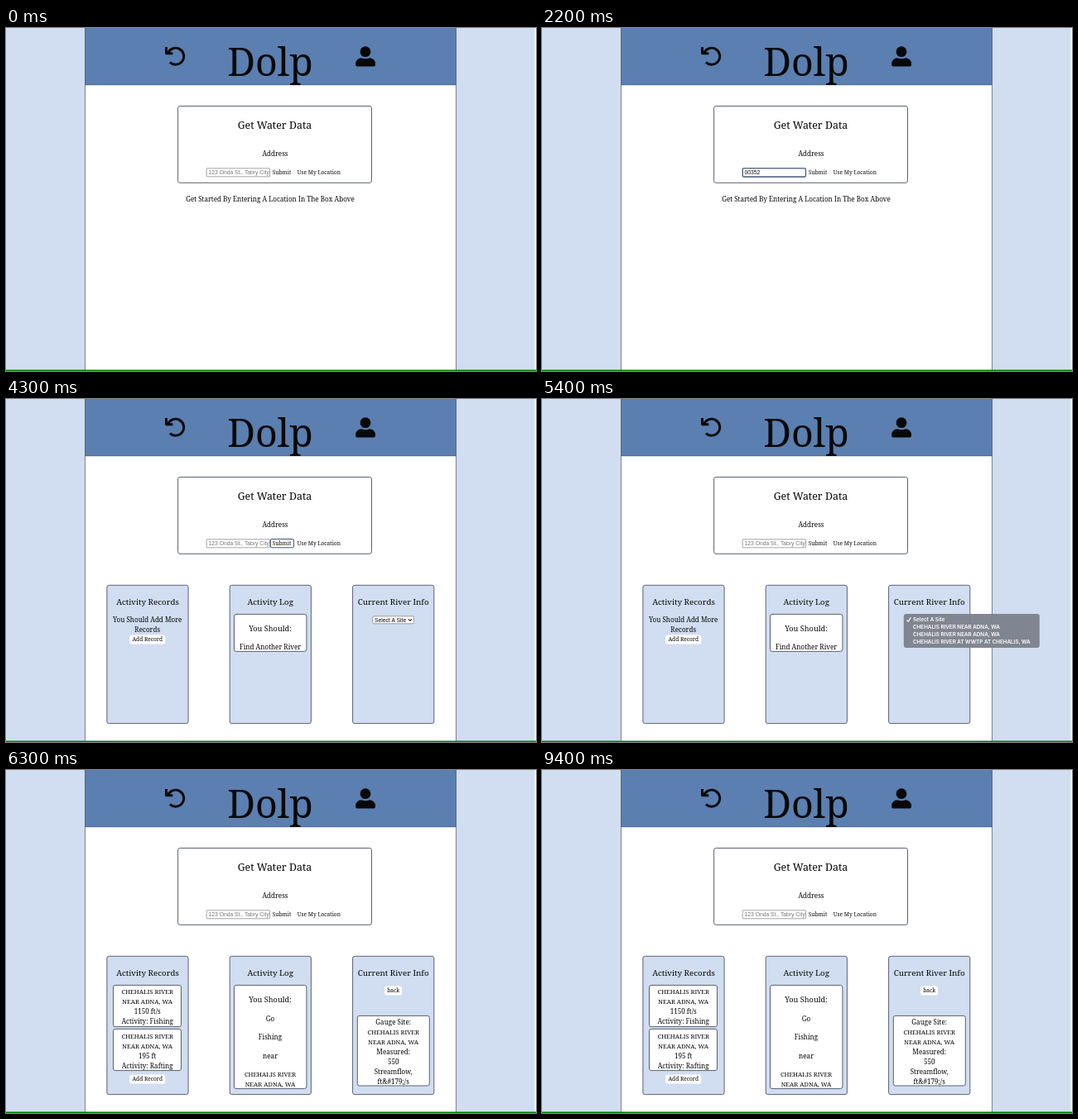
An HTML page that plays this animation: 640 by 415 pixels, repeating every 9.7 s.

```html
<!DOCTYPE html>
<html lang="en">
<head>
<meta charset="utf-8">
<title>Water data</title>
<style>
html, body { margin: 0; width: 100%; height: 100%; overflow: hidden; background: #fff; }
svg { display: block; width: 640px; height: 415px; }
text { font-family: "Noto Serif", serif; fill: #080808; white-space: pre; }
.ui { font-family: "Liberation Sans", Arial, sans-serif; }
.menu { font-family: Inter, sans-serif; font-weight: 600; fill: #fff; }
.hint { fill: #777; }
</style>
</head>
<body>
<svg id="stage" viewBox="0 0 640 415"></svg>
<script>
const LOOP = 9700;
const PALE = '#d1ddf0', LINE = '#4a5261', BLUE = '#5a7fb0', FOCUS = '#3a5480';
const stage = document.getElementById('stage');

function add(parent, tag, attrs = {}, content = '') {
  const el = document.createElementNS('http://www.w3.org/2000/svg', tag);
  for (const key in attrs) el.setAttribute(key, attrs[key]);
  el.textContent = content;
  return parent.appendChild(el);
}

const group = (parent = stage) => add(parent, 'g');

function box(parent, x, y, width, height, fill, stroke = 'none', rx = 0, lineWidth = 1) {
  return add(parent, 'rect', { x, y, width, height, fill, stroke, rx, 'stroke-width': lineWidth });
}

// y is the middle of the capital letters
function label(parent, content, x, y, size, className = '', anchor = 'middle') {
  return add(parent, 'text', {
    x, y: y + size * 0.357, 'font-size': size, 'text-anchor': anchor, class: className
  }, content);
}

// Opacity changes as hard steps: [time, value] pairs, hidden before the first one
function steps(el, table) {
  const start = table[0][0] > 0 ? [[0, 0]] : [];
  const end = [LOOP, table[table.length - 1][1]];
  const frames = [...start, ...table, end].map(([time, opacity]) => ({
    offset: time / LOOP, opacity, easing: 'steps(1, end)'
  }));
  el.animate(frames, { duration: LOOP, iterations: Infinity });
}

function lines(parent, rows, x, top, gap) {
  rows.forEach((row, i) => {
    const size = row === row.toUpperCase() && row.length > 4 ? 7.5 : 8.1;
    label(parent, row, x, top + i * gap, size);
  });
}

function button(parent, content, x, y, width) {
  box(parent, x - width / 2, y - 5.5, width, 11, '#fff', 'none', 2.5);
  label(parent, content, x, y, 6.6);
}

function panel(parent, x, y, width, height, fill = '#fff') {
  box(parent, x, y, width, height, fill, LINE, 2.5, 0.9);
}

function drawPage() {
  box(stage, 0, 0, 638.6, 415, PALE);
  box(stage, 95, 0, 449, 415, '#fff');
  box(stage, 95, 0, 449, 69, BLUE);
  box(stage, 95, 68.6, 449, 0.6, '#3d5578');
  box(stage, 95, 0, 0.8, 415, '#5a6474');
  box(stage, 543, 0, 0.8, 415, '#5a6474');
  box(stage, 0, 413.5, 640, 1.5, 'green');

  add(stage, 'path', {
    d: 'M193.5 23V30.8H201.3M195.4 30.6A10 10 0 1 1 198 41.6',
    fill: 'none', stroke: '#080808', 'stroke-width': 2.9, 'stroke-linejoin': 'round'
  });
  add(stage, 'circle', { cx: 434, cy: 28.7, r: 6.4, fill: '#080808' });
  add(stage, 'path', {
    d: 'M422.2 44.5v-1.2a7 7 0 0 1 7-7q4.9 2 9.8 0a7 7 0 0 1 7 7v1.2a2 2 0 0 1-2 2h-19.8a2 2 0 0 1-2-2z',
    fill: '#080808'
  });
  label(stage, 'Dolp', 319, 41, 46.5);

  panel(stage, 207.6, 94.5, 233.9, 92.8);
  label(stage, 'Get Water Data', 324.5, 118, 12.4);
  label(stage, 'Address', 325, 152.5, 8.1);
  box(stage, 242.2, 169.8, 76.4, 10, '#fff', '#8e8e8e', 0.5, 0.8);
  label(stage, 'Submit', 333, 175, 6.6);
  label(stage, 'Use My Location', 377.8, 175, 6.65);
}

function drawSearch() {
  const hint = label(stage, '123 Onda St., Tabry City', 244.5, 175, 6.75, 'ui hint', 'start');
  const value = label(stage, '00352', 244.5, 175, 6.75, 'ui', 'start');
  const focus = group();
  box(focus, 242.3, 169.7, 76.2, 10.4, 'none', FOCUS, 1.5, 1.1);
  const caret = box(stage, 244.2, 171.2, 0.7, 7.4, '#111');
  const submit = box(stage, 319.4, 169.5, 28.2, 10.3, 'none', FOCUS, 1.5, 1);

  const prompt = label(stage, 'Get Started By Entering A Location In The Box Above', 319, 207, 8.1);
  const popup = group();
  box(popup, 242, 181, 96, 26, '#434649', 'none', 2);
  label(popup, '00352', 248, 194.3, 6.6, 'menu', 'start');

  steps(hint, [[0, 1], [1800, 0], [2900, 1]]);
  steps(value, [[1800, 1], [2900, 0]]);
  steps(focus, [[1100, 1], [2900, 0]]);
  steps(caret, [[1100, 1], [1800, 0]]);
  steps(popup, [[1500, 1], [2000, 0.7], [2100, 0.35], [2200, 0]]);
  steps(submit, [[2900, 0.6], [3000, 1], [5100, 0]]);
  steps(prompt, [[0, 1], [4300, 0]]);
}

function drawCards() {
  const cards = group();
  [['Activity Records', 171], ['Activity Log', 319.3], ['Current River Info', 467.7]].forEach(([title, x]) => {
    panel(cards, x - 49.1, 225.3, 98.2, 167.3, PALE);
    label(cards, title, x, 245.5, 9.8);
  });
  steps(cards, [[4300, 1]]);
}

function drawEmptyState() {
  const empty = group();
  lines(empty, ['You Should Add More', 'Records'], 170.7, 267, 12);
  button(empty, 'Add Record', 170.8, 291, 43);
  panel(empty, 275.5, 260.4, 87.4, 45);
  label(empty, 'You Should:', 319, 278, 9.2);
  label(empty, 'Find Another River', 319, 300, 8.1);

  box(empty, 442.8, 262.8, 49.8, 9, '#fff', '#777', 1.5, 0.7);
  label(empty, 'Select A Site', 445, 267.4, 6.8, 'ui', 'start');
  add(empty, 'path', { d: 'M486 266.3l2 2 2-2', fill: 'none', stroke: '#111', 'stroke-width': 1.1 });
  steps(empty, [[4300, 1], [6300, 0]]);
}

function drawResults() {
  const site = ['CHEHALIS RIVER', 'NEAR ADNA, WA'];
  const results = group();
  panel(results, 129.5, 260.4, 82, 50.2);
  lines(results, [...site, '1150 ft/s', 'Activity: Fishing'], 170.7, 268.5, 12);
  panel(results, 129.5, 313.4, 82, 50.2);
  lines(results, [...site, '195 ft', 'Activity: Rafting'], 170.7, 322, 12);
  button(results, 'Add Record', 170.8, 374, 43);

  panel(results, 275.5, 260.4, 87.4, 125.2);
  label(results, 'You Should:', 319, 278, 9.2);
  lines(results, ['Go', 'Fishing', 'near'], 319, 301, 22.6);
  lines(results, site, 319, 368.5, 12);

  button(results, 'back', 467.6, 267, 21);
  panel(results, 424.3, 297.4, 87, 84.6);
  lines(results, ['Gauge Site:', ...site, 'Measured:', '550', 'Streamflow,', 'ft&#179;/s'], 467.7, 305, 12);
  steps(results, [[6300, 1]]);
}

function drawMenu() {
  const menu = group();
  box(menu, 436.8, 260, 164, 41, '#7d838d', 'none', 3).setAttribute('fill-opacity', 0.96);
  ['Select A Site', 'CHEHALIS RIVER NEAR ADNA, WA', 'CHEHALIS RIVER NEAR ADNA, WA',
    'CHEHALIS RIVER AT WWTP AT CHEHALIS, WA'].forEach((row, i) => {
    label(menu, row, 448, 267 + i * 8.95, 6.3, 'menu', 'start');
  });
  add(menu, 'path', {
    d: 'M440.6 267.4l1.6 2 3.2-5', fill: 'none', stroke: '#fff', 'stroke-width': 1.1
  });
  steps(menu, [[5300, 1], [6100, 0.7], [6200, 0.35], [6300, 0]]);
}

drawPage();
drawSearch();
drawCards();
drawEmptyState();
drawResults();
drawMenu();
</script>
</body>
</html>
```
